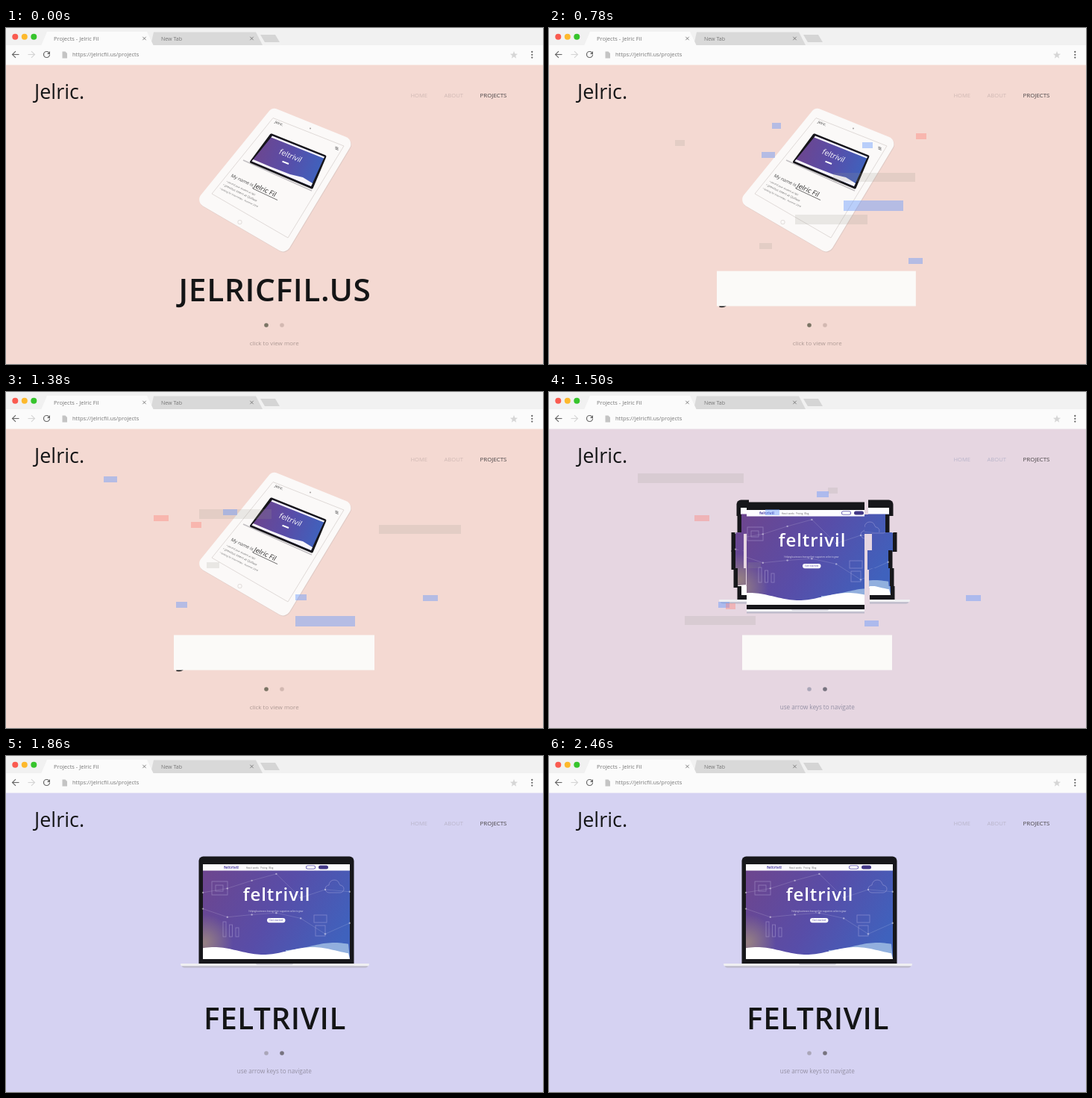
Write an HTML page with a canvas that moves like this. It is 720 px wide and 450 px high and loops after 2.52 s.

```html
<!DOCTYPE html>
<html lang="en">
<head>
<meta charset="utf-8">
<title>Portfolio slider</title>
<style>
  html, body { margin: 0; width: 100%; height: 100%; overflow: hidden; background: #f4d9d2; }
  canvas { display: block; }
</style>
</head>
<body>
<canvas id="stage" width="720" height="450"></canvas>
<script>
const screenCtx = document.getElementById('stage').getContext('2d');
let c = screenCtx;

const LOOP = 2520, STEP = 60, SWAP = 1500;
const PINK = [244, 217, 210], LILAC = [213, 210, 242], INK = '#141516';
const RED = 'rgba(255,120,110,.36)', GREY = 'rgba(150,150,140,.18)', BLUE = 'rgba(100,150,250,.44)';
const UI = '"Open Sans", "Noto Sans", sans-serif';

const clamp = v => Math.max(0, Math.min(1, v));
const progress = (t, from, to) => clamp((t - from) / (to - from));
const lerp = (a, b, p) => a + (b - a) * p;
const easeOut = (p, power) => 1 - Math.pow(1 - p, power);
const loop = (n, draw) => { for (let i = 0; i < n; i++) draw(i); };

function random(seed) {
  const v = Math.sin(seed * 12.9898 + 4.1) * 43758.5453;
  return v - Math.floor(v);
}

// The headings use the narrowest of the available families.
const CONDENSED = ['Roboto', 'Open Sans', 'Noto Sans', 'Lato'].map(name => {
  const family = `"${name}", sans-serif`;
  c.font = `600 condensed 40px ${family}`;
  return { family, width: c.measureText('JELRICFIL.US').width };
}).sort((a, b) => a.width - b.width)[0].family;

function rect(x, y, w, h, fill) {
  c.fillStyle = fill;
  c.fillRect(x, y, w, h);
}

function rounded(x, y, w, h, r, fill) {
  c.beginPath();
  c.roundRect(x, y, w, h, r);
  c.fillStyle = fill;
  c.fill();
}

function disc(x, y, r, fill) {
  c.beginPath();
  c.arc(x, y, r, 0, Math.PI * 2);
  c.fillStyle = fill;
  c.fill();
}

function trace(points, closed) {
  c.beginPath();
  points.forEach(([x, y]) => c.lineTo(x, y));
  if (closed) c.closePath();
}

function poly(points, fill) {
  trace(points, true);
  c.fillStyle = fill;
  c.fill();
}

function line(points, stroke, width = 1, closed = false) {
  trace(points, closed);
  c.strokeStyle = stroke;
  c.lineWidth = width;
  c.stroke();
}

function roundedPoly(points, r, fill) {
  const next = i => points[(i + 1) % points.length];
  const last = points[points.length - 1];
  c.beginPath();
  c.moveTo((points[0][0] + last[0]) / 2, (points[0][1] + last[1]) / 2);
  points.forEach((p, i) => c.arcTo(...p, ...next(i), r));
  c.closePath();
  c.fillStyle = fill;
  c.fill();
}

// Lowers the font size when the text runs wider than its room.
function label(text, x, y, size, room, fill, { weight = 400, align = 'left', spacing = 0, family = CONDENSED } = {}) {
  const setFont = px => {
    c.font = `${weight} ${family === UI ? '' : 'condensed'} ${px}px ${family}`;
    c.letterSpacing = spacing * px + 'px';
  };
  setFont(size);
  setFont(size * Math.min(1, room / c.measureText(text).width));
  c.textAlign = align;
  c.fillStyle = fill;
  c.fillText(text, x, y);
}

function cross(x, y) {
  line([[x - 2.2, y - 2.2], [x + 2.2, y + 2.2]], '#777', 0.9);
  line([[x + 2.2, y - 2.2], [x - 2.2, y + 2.2]], '#777', 0.9);
}

function arrow(x, y, dir, color) {
  line([[x - 4.5 * dir, y], [x + 4.5 * dir, y]], color, 1.1);
  line([[x, y - 4.4], [x + 4.5 * dir, y], [x, y + 4.4]], color, 1.1);
}

function browser() {
  rect(0, 0, 720, 24, '#f1f1f1');
  poly([[194, 23], [198, 5.5], [335, 5.5], [344, 23]], '#d9d9d9');
  poly([[341, 9], [361, 9], [367, 19], [347, 19]], '#d5d5d5');
  poly([[47, 24], [55, 5], [189, 5], [198, 24]], '#fbfbfb');
  rect(0, 23, 720, 26.5, '#fbfbfb');
  ['#fa5b50', '#fdb92d', '#36c42c'].forEach((color, i) => disc(12.3 + i * 12.5, 11.8, 4, color));
  label('Projects - Jelric Fil', 64, 17, 7.5, 67, '#777', { family: UI });
  label('New Tab', 208, 17, 7.5, 28, '#777', { family: UI });
  cross(185.5, 14);
  cross(329.5, 14);

  arrow(13, 35.5, -1, '#666');
  arrow(34, 35.5, 1, '#d5d5d5');
  c.beginPath();
  c.arc(54.5, 35.5, 4, 0, Math.PI * 1.75);
  c.strokeStyle = '#666';
  c.lineWidth = 1.2;
  c.stroke();
  poly([[59, 31], [59, 35], [55, 35]], '#666');
  poly([[75.5, 31.5], [79.5, 31.5], [82, 34], [82, 40.5], [75.5, 40.5]], '#c4c4c4');
  label('https://jelricfil.us/projects', 89, 38.3, 7.5, 93, '#777', { family: UI });
  poly(Array.from({ length: 10 }, (_, i) => {
    const a = -Math.PI / 2 + i * Math.PI / 5, r = i % 2 ? 2.3 : 5.4;
    return [681 + r * Math.cos(a), 36.3 + r * Math.sin(a)];
  }), '#d6d6d6');
  loop(3, i => disc(705.3, 32 + i * 3.8, 1.15, '#666'));
}

function screenGradient(x0, y0, x1, y1) {
  const g = c.createLinearGradient(x0, y0, x1, y1);
  g.addColorStop(0, '#6c4690');
  g.addColorStop(0.5, '#584da8');
  g.addColorStop(1, '#3f62bd');
  return g;
}

function slanted(text, x, y, size, room, fill, angle, options) {
  c.save();
  c.translate(x, y);
  c.rotate(angle);
  c.transform(1, 0, -0.15, 1, 0, 0);
  label(text, 0, 0, size, room, fill, options);
  c.restore();
}

function tablet() {
  const body = [[357, 106], [467, 150.5], [375, 303], [254, 232.5]];
  roundedPoly(body.map(([x, y]) => [x + 0.6, y + 1]), 10, '#dfcac5');
  roundedPoly(body, 10, '#fbf9f8');
  line([[358, 120.5], [453, 158], [378, 281], [276, 222]], '#d8d2d0', 0.8, true);
  disc(408, 134.5, 1.1, '#aaa6a5');
  disc(313.5, 260, 3, '#ddd7d5');
  disc(313.5, 260, 2.3, '#fbf9f8');
  slanted('Jelric.', 360, 127, 4.8, 12, '#333', 0.38);
  loop(3, i => line([[441.5, 159 + i * 1.5], [445.5, 160.5 + i * 1.5]], '#555', 0.7));

  line([[318, 177], [410, 218]], '#c4c1c4', 1.8);
  roundedPoly([[355, 141], [430, 171], [411, 216], [326, 180]], 2, '#17161b');
  poly([[357, 144.5], [427, 172.5], [409, 212], [329.5, 178.5]], screenGradient(336, 165, 420, 195));
  poly([[357, 144.5], [427, 172.5], [426, 174.5], [355.5, 146.5]], '#f6f4fa');
  poly([[331.5, 176], [355, 186], [381, 196], [398, 200], [411, 208], [409, 212], [329.5, 178.5]], '#f7f5fb');
  slanted('feltrivil', 365, 168, 10, 38, '#fff', 0.39, { family: UI });
  line([[370.5, 178.6], [379, 182]], '#fff', 2);

  slanted('My name is ', 301, 199, 9, 34, '#444', 0.43);
  slanted('Jelric Fil', 331.5, 213, 9, 36, '#222', 0.43, { weight: 500 });
  line([[331, 215], [364, 230.5]], '#333', 0.7);
  ['• second year student at NJU', '• previous intern at Quillow', '• looking for internships · Summer 2018'].forEach((text, i) => {
    slanted(text, 295 - i * 4.5, 206 + i * 4.8, 4.6, 43 + i * 7, '#666', 0.45);
  });
}

function wave(x0, x1, level, swell, phase, fill) {
  const points = [[x1, 272], [x0, 272]];
  for (let x = x0; x <= x1; x += 3) points.push([x, level + swell * Math.sin(x / 21 + phase)]);
  poly(points, fill);
}

function network(level, seed) {
  const nodes = Array.from({ length: 7 }, (_, i) => [264 + i * 32.8, level + 36 * (random(seed + i) - 0.5)]);
  line(nodes, 'rgba(255,255,255,.25)', 0.6);
  nodes.forEach(([x, y]) => disc(x, y, 1.2, 'rgba(255,255,255,.45)'));
}

function pageArt() {
  network(172, 3);
  network(222, 20);
  c.strokeStyle = 'rgba(215,205,240,.35)';
  c.lineWidth = 0.9;
  c.strokeRect(276, 168, 21, 18);
  c.strokeRect(281, 173, 10, 8);
  loop(3, i => c.strokeRect(291 + i * 8.5, 222 + i * 4, 4, 20 - i * 4));
  c.beginPath();
  c.arc(433, 178, 5, Math.PI * 0.5, Math.PI * 1.4);
  c.arc(440, 173, 7, Math.PI, Math.PI * 1.9);
  c.arc(448, 178, 5, Math.PI * 1.5, Math.PI * 0.5);
  c.closePath();
  c.stroke();
  c.strokeRect(413, 213, 17, 10);
  c.strokeRect(415, 227, 13, 14);
}

function laptop() {
  rounded(235, 279, 251, 4.5, [0, 0, 8, 8], '#bcb9c9');
  rounded(234, 278, 253, 3.2, [1, 1, 4, 4], '#efeff2');
  rounded(335, 278, 50, 2, [0, 0, 2, 2], '#d3d2da');
  rounded(258.5, 134.5, 208, 143.5, [6, 6, 0, 0], '#17171b');
  rect(264, 145, 197, 127, screenGradient(268, 165, 440, 265));
  const glow = c.createRadialGradient(266, 250, 2, 266, 250, 38);
  glow.addColorStop(0, 'rgba(165,145,125,.75)');
  glow.addColorStop(1, 'rgba(165,145,125,0)');
  rect(264, 205, 50, 67, glow);
  pageArt();

  const small = { family: UI, align: 'center' };
  rect(264, 145, 197, 8.5, '#fdfcff');
  label('feltrivil', 302, 151, 5.5, 20, '#5548a8', { ...small, weight: 700 });
  label('How it works   Pricing   Blog', 340, 150.7, 3.6, 37, '#666', small);
  rounded(402, 146.5, 13, 5, 2.5, '#5548a8');
  rounded(402.7, 147.2, 11.6, 3.6, 1.8, '#fff');
  rounded(419, 146.5, 13, 5, 2.5, '#433886');

  label('feltrivil', 363, 194, 24, 94, '#fff', { ...small, weight: 600, spacing: 0.04 });
  label('Helping businesses leverage their supporters online to grow', 362, 208.5, 3.6, 73, 'rgba(255,255,255,.8)', small);
  rounded(350, 217, 24.5, 6.2, 3.1, '#fff');
  label('Get started', 362.2, 221.4, 3.5, 18, '#5548a8', small);

  wave(375, 461, 255, 5, 2.6, 'rgba(160,190,228,.85)');
  wave(264, 461, 261, 5, 4, '#fff');
}

const laptopLayer = document.createElement('canvas');
laptopLayer.width = 720;
laptopLayer.height = 450;
c = laptopLayer.getContext('2d');
laptop();
c = screenCtx;

// The middle strips move as one; the outer ones are torn into rows.
function slicedLaptop(t) {
  const force = Math.max(0, (1800 - t) / 120);
  const w = 79, h = 26;
  loop(4, col => loop(6, row => {
    const x = 196 + col * w, y = 130 + row * h;
    const outer = col % 3 === 0;
    const dx = outer ? -7 * random(col * 6 + row) : -4;
    const dy = outer ? 4 * (1 - row / 5) : 5;
    c.drawImage(laptopLayer, x, y, w, h, Math.round(x + dx * force), Math.round(y + dy * force), w, h);
  }));
}

const LONG_BLOCKS = [
  { color: GREY, w: 110, h: 12, from: [381, 194], to: [500, 178], start: 780, end: 1380 },
  { color: GREY, w: 97, h: 13, from: [330, 250], to: [259, 157], start: 900, end: 1380 },
  { color: BLUE, w: 80, h: 14, from: [395, 231], to: [388, 300], start: 780, end: 1380 },
  { color: GREY, w: 142, h: 13, from: [119, 109], to: [119, 109], start: 1620, end: 1740 },
  { color: GREY, w: 95, h: 12, from: [182, 300], to: [182, 300], start: 1620, end: 1740 }
];

function blocks(t) {
  for (const { color, w, h, from, to, start, end } of LONG_BLOCKS) {
    if (t < start - 120 || t > end + 60) continue;
    const p = progress(t, start, end);
    rect(Math.round(lerp(from[0], to[0], p)), Math.round(lerp(from[1], to[1], p)), w, h, color);
  }
  const colors = [BLUE, GREY, BLUE, RED, BLUE];
  loop(30, i => {
    const birth = 570 + i * 32;
    if (t < birth || t > birth + 260) return;
    const x = 120 + 460 * random(i), y = 110 + 205 * random(i + 50);
    const drift = (t - birth) * 0.06 * (random(i + 90) - 0.5);
    rect(Math.round(x + drift), Math.round(y), Math.round(12 + 8 * random(i + 70)), 8, colors[i % 5]);
  });
}

function cover(t) {
  const paper = '#fbfaf8';
  if (t < SWAP) {
    rect(225, 325.5, 269 * easeOut(progress(t, 500, 850), 3), 47, paper);
  } else {
    const p = easeOut(progress(t, SWAP, 1740), 1.85);
    rect(259 + 201 * p, 325.5, 201 * (1 - p), 47, paper);
  }
}

const SLIDES = [
  { title: 'JELRICFIL.US', room: 258, hint: 'click to view more', hintRoom: 66,
    active: '#7a7464', idle: '#d2b8b1', hintColor: '#ad9994', navColor: '#d0b9b4', picture: tablet },
  { title: 'FELTRIVIL', room: 191, hint: 'use arrow keys to navigate', hintRoom: 100,
    active: '#77737f', idle: '#aaa6b8', hintColor: '#9490a4', navColor: '#b9b5ca', picture: slicedLaptop }
];

function draw(t) {
  const index = t < SWAP ? 0 : 1;
  const slide = SLIDES[index];
  const tint = progress(t, 1400, 1620);
  rect(0, 0, 720, 450, `rgb(${PINK.map((v, i) => Math.round(lerp(v, LILAC[i], tint)))})`);
  browser();

  label('Jelric.', 38, 95, 27, 70, INK);
  label('HOME', 542.5, 92.5, 10, 22.5, slide.navColor);
  label('ABOUT', 587.5, 92.5, 10, 25.5, slide.navColor);
  label('PROJECTS', 635.5, 92.5, 10, 36, '#484345', { weight: 500 });

  slide.picture(t);
  blocks(t);
  label(slide.title, 360.5, 365.5, 46, slide.room, INK, { weight: 600, align: 'center', spacing: 0.015 });
  cover(t);

  loop(2, i => disc(349 + i * 21, 398, 2.8, i === index ? slide.active : slide.idle));
  label(slide.hint, 359.7, 425, 10.3, slide.hintRoom, slide.hintColor, { align: 'center' });
}

function tick() {
  const t = performance.now() % LOOP;
  draw(Math.floor(t / STEP) * STEP);
  requestAnimationFrame(tick);
}
tick();
</script>
</body>
</html>
```
